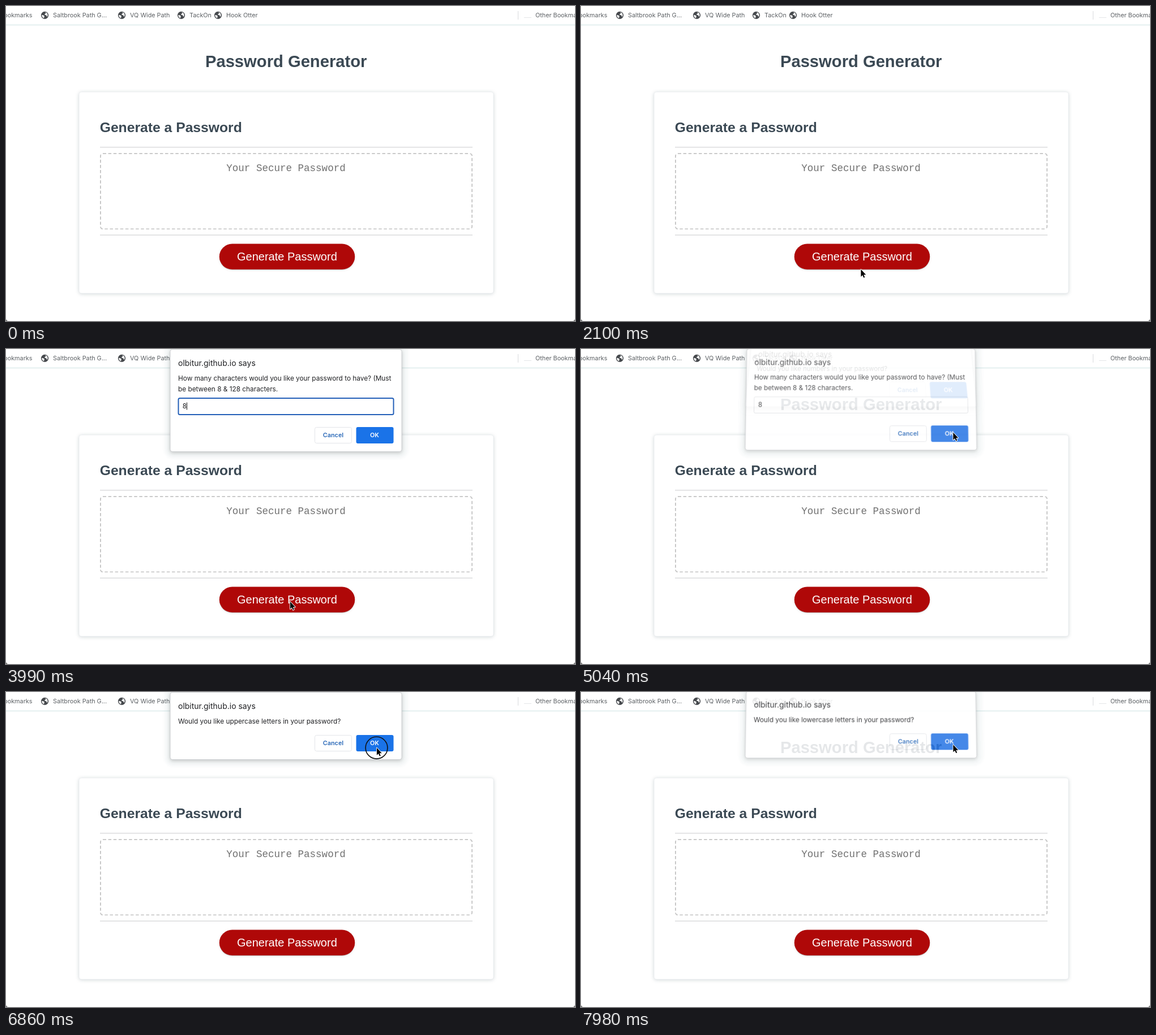
Recreate the animation shown at these times as an HTML page. Size 1005 by 557 pixels, loop 8 s.

```html
<!DOCTYPE html>
<html lang="en">
<head>
<meta charset="utf-8">
<title>Password Generator</title>
<style>
html, body { margin: 0; width: 100%; height: 100%; overflow: hidden; background: #fff; }
#stage { position: relative; width: 1005px; height: 557px; overflow: hidden; }
#stage > svg { position: absolute; left: 0; top: 0; overflow: visible; }
#box {
  position: absolute; left: 166px; top: 260px; width: 720px; height: 147.5px; box-sizing: border-box;
  border: 2px dashed #c3c3c3; border-radius: 6px; transform: scale(.914); transform-origin: 0 0;
}
text { white-space: pre; }
.ui { font-family: Inter, "Open Sans", sans-serif; }
.bar { font-size: 10.8px; fill: #5c6064; }
.page { font-family: "Liberation Sans", Arial, sans-serif; }
.head { font-weight: 700; fill: #3b4954; }
.mono { font-family: "Liberation Mono", "Courier New", monospace; font-size: 17.55px; fill: #717171; }
.says { font-size: 14px; fill: #202124; }
.ask { font-size: 11.82px; fill: #202124; }
.btn { font-size: 10.8px; font-weight: 600; text-anchor: middle; }
.card { filter: drop-shadow(0 1px 3px rgba(60, 80, 90, .22)); }
.pill { filter: drop-shadow(0 1px .5px rgba(0, 0, 0, .2)) drop-shadow(0 1px 2px rgba(0, 0, 0, .08)); }
.sheet { filter: drop-shadow(0 2px 3px rgba(0, 0, 0, .2)); }
.halo { filter: blur(2.5px); }
</style>
</head>
<body>
<div id="stage">
  <svg id="page" width="1005" height="557">
    <defs>
      <g id="globe">
        <circle r="6.6" fill="#46494d"/>
        <path d="M-5.2 -.6L-2.2 .3L-.4 2L-1.3 3.2L-1.1 5.2C-3.8 4.6 -5.4 2.4 -5.2 -.6ZM-.6 -5.2L2 -4.8L1.6 -3L-.3 -2L.2 -.6L2.6 0L3.4 1.8L4.4 2.6C5.6 .4 5.3 -2.2 3.6 -3.8L2 -5.2Z" fill="#fff"/>
      </g>
    </defs>
    <rect width="1005" height="557" fill="#fff"/>
    <g id="bar" class="ui bar">
      <text x="46.5" y="20" text-anchor="end">Bookmarks</text>
      <text x="935" y="20">Other Bookmarks</text>
    </g>
    <path d="M904.5 9V24" stroke="#d9dbdd"/>
    <path d="M915 20.5H928" stroke="#e4e6e8"/>
    <path d="M0 33.5H1005" stroke="#dcebeb" stroke-width="1.4"/>
    <text class="page head" x="494.7" y="108" font-size="29.2" text-anchor="middle">Password Generator</text>
    <rect class="card" x="129" y="152" width="732" height="356" rx="4" fill="#fff" stroke="#e9edef" stroke-width=".8"/>
    <text class="page head" x="165.7" y="223" font-size="24.7">Generate a Password</text>
    <path d="M166 249.7H824M166 405H824" stroke="#e3e4e5" stroke-width="1.9"/>
    <text class="mono" x="389.3" y="291.5">Your Secure Password</text>
    <rect class="pill" x="376.8" y="420.5" width="239.4" height="45.3" rx="22.65" fill="#af0808"/>
    <text class="page" x="496.4" y="450" font-size="20" fill="#fff" text-anchor="middle">Generate Password</text>
    <path d="M0 554V557H3ZM1005 554V557H1002Z" fill="#777"/>
  </svg>
  <div id="box"></div>
  <svg id="pointer" width="1005" height="557">
    <g id="cursor">
      <circle id="ring" cx="0" cy=".7" r="19.4" fill="none" stroke="#111" stroke-width="1.6"/>
      <path d="M.4 .8V13.8L3.3 11.1L5.4 15.6L7.3 14.7L5.3 10.3H9.3Z" fill="#000" stroke="#fff" stroke-width="1.8" stroke-linejoin="round" paint-order="stroke"/>
    </g>
  </svg>
</div>
<script>
const LOOP = 8000, STEP = 70, FADE = 150, PRESS = 140;
const $ = id => document.getElementById(id);
const clamp = v => Math.max(0, Math.min(1, v));

const bookmarks = [[68, "Saltbrook Path G..."], [204, "VQ Wide Path"], [309, "TackOn"], [374, "Hook Otter"]];
$("bar").innerHTML += bookmarks.map(([x, name]) =>
  `<use href="#globe" x="${x + .5}" y="16.3"/><text x="${x + 15}" y="20">${name}</text>`).join("");

const question = kind => [`Would you like ${kind} in your password?`];
const dialogs = [
  { lines: ["How many characters would you like your password to have? (Must", "be between 8 &amp; 128 characters."], prompt: true, open: 2570, close: 5020 },
  { lines: question("numbers"), open: 5020, close: 6210 },
  { lines: question("uppercase letters"), open: 6210, close: 6980 },
  { lines: question("lowercase letters"), open: 7050, close: 7960 }
];

const promptField = `
  <rect id="field" x="304.5" y="87" width="380" height="29" rx="2.5" fill="#fff"/>
  <text id="typed" class="ask" x="311.7" y="105">8</text>
  <path id="caret" d="M0 94.5V107.5" stroke="#111"/>`;

function dialogMarkup({ lines, prompt, top }, height) {
  const rows = lines.map((line, i) => `<text class="ask" x="304" y="${56.3 + i * 18.4}">${line}</text>`).join("");
  return `
    <rect class="halo" x="280" y="-20" width="430" height="${height + 32}" rx="16" fill="#46707a" opacity=".05"/>
    <rect class="sheet" x="290" y=".5" width="409" height="${height - .5}" rx="4" fill="#fff" stroke="#c2c5c8" stroke-width=".8"/>
    <g class="ui">
      <text class="says" x="304" y="30">olbitur.github.io says</text>
      ${rows}${prompt ? promptField : ""}
      <rect x="545.5" y="${top + .5}" width="65" height="28" rx="3" fill="#fff" stroke="#e3e5e9"/>
      <text class="btn" x="578" y="${top + 18.4}" fill="#2a69b8">Cancel</text>
      <rect class="ok" x="618.5" y="${top}" width="66" height="29" rx="3"/>
      <text class="btn" x="651" y="${top + 18.4}" fill="#fff">OK</text>
    </g>`;
}

for (const d of dialogs) {
  const height = d.prompt ? 181.5 : 119.5;
  d.top = height - 43.5;
  d.el = document.createElementNS("http://www.w3.org/2000/svg", "svg");
  d.el.setAttribute("width", 1005);
  d.el.setAttribute("height", height);
  d.el.style.transformOrigin = `494.5px ${height}px`;
  d.el.innerHTML = dialogMarkup(d, height);
  d.ok = d.el.querySelector(".ok");
  $("stage").insertBefore(d.el, $("pointer"));
}

// Pointer stops: time, x, y
const path = [
  [70, 143, 10], [210, 250, 150], [350, 400, 400], [490, 520, 494], [560, 602, 482], [700, 575, 440],
  [840, 575, 440], [910, 566, 450], [1470, 566, 450], [1680, 548, 416], [1890, 508, 446],
  [2100, 494, 465], [2310, 491, 465], [2520, 491, 465], [2730, 495, 457], [3920, 495, 457],
  [3990, 501.5, 446], [4060, 600, 230], [4130, 671, 40], [4340, 671, 40], [4760, 657, 147],
  [5530, 657, 147], [5810, 654.5, 98], [7350, 654.5, 98], [7700, 657, 92.5], [LOOP, 657, 92.5]
];
const clicks = [2450, 4900, 6090, 6860, 7840];

function pointerAt(t) {
  const i = Math.max(1, path.findIndex(p => p[0] > t));
  const [t0, x0, y0] = path[i - 1], [t1, x1, y1] = path[i];
  const k = clamp((t - t0) / (t1 - t0));
  return [x0 + (x1 - x0) * k, y0 + (y1 - y0) * k];
}

const show = (el, on) => { el.style.visibility = on ? "visible" : "hidden"; };

// The sheet tips back and lifts as it fades.
function drawDialog({ el, ok, top, open, close }, t, x, y, pressed) {
  const shown = clamp((t - open) / FADE) - clamp((t - close) / FADE);
  const away = 1 - shown, tilt = .0006 * away;
  const hover = !pressed && x > 618 && x < 685 && y > top && y < top + 29;
  show(el, shown > 0);
  ok.setAttribute("fill", hover ? "#2875e5" : "#1a73e8");
  el.style.opacity = shown;
  el.style.transform = away
    ? `translateY(${-20 * away}px) matrix3d(1,0,0,0, 0,${1 + 60 * tilt},0,${-tilt}, 0,0,1,0, 0,0,0,1)`
    : "none";
}

function drawField(t) {
  const focused = t < 5020, typed = t >= 3640;
  const since = t - (typed ? 3640 : 2730);
  $("field").setAttribute("stroke", focused ? "#2460b8" : "#e0e2e5");
  $("field").setAttribute("stroke-width", focused ? 2 : 1);
  $("typed").style.display = typed ? "" : "none";
  $("caret").style.display = focused && (since < 0 || Math.floor(since / 490) % 2 === 0) ? "" : "none";
  $("caret").setAttribute("transform", `translate(${typed ? 319.5 : 312.5} 0)`);
}

function draw(time) {
  const t = Math.floor((time % LOOP) / STEP) * STEP;
  const [x, y] = pointerAt(t);
  const pressed = clicks.some(c => t >= c && t < c + PRESS);
  dialogs.forEach(d => drawDialog(d, t, x, y, pressed));
  drawField(t);
  $("cursor").setAttribute("transform", `translate(${x} ${y})`);
  $("cursor").style.display = t >= 70 ? "" : "none";
  show($("ring"), pressed && t >= 70);
}

const start = performance.now();
function tick() {
  draw(performance.now() - start);
  requestAnimationFrame(tick);
}
tick();
</script>
</body>
</html>
```
